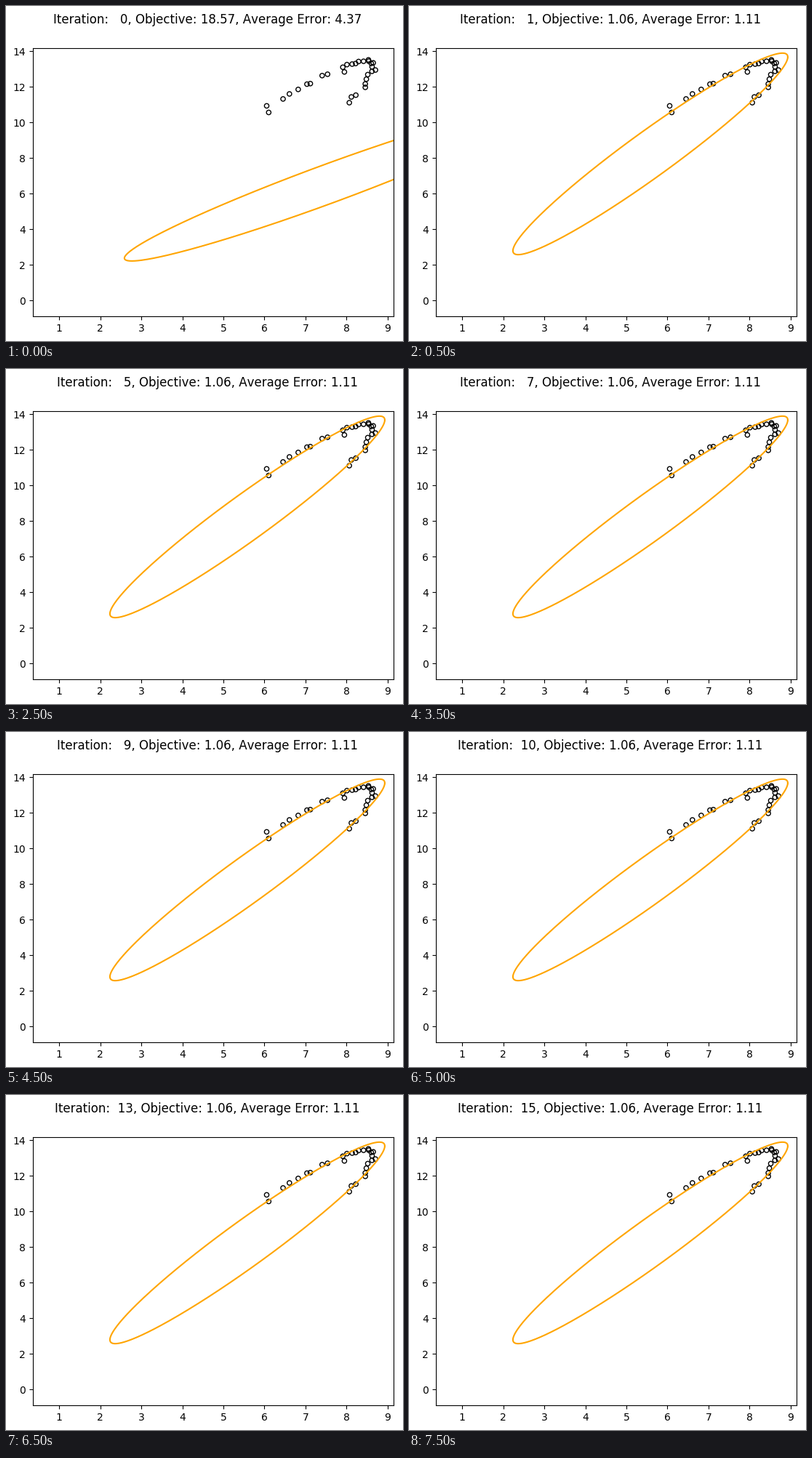
Write a matplotlib script that moves like this. It is 546 px wide and 461 px high and loops after 8 s.

```python
import numpy as np
import matplotlib.pyplot as plt
from matplotlib.animation import FuncAnimation

W, H, DPI = 546, 461, 100
STEPS, STEP_MS = 16, 500
LEFT, BOTTOM = 36.9, 33.8

plt.rcParams["font.family"] = "DejaVu Sans"
plt.rcParams["text.kerning_factor"] = 6


def ellipse(t, cx, cy, a, b, lag):
    """Points at angles t; y trails x by a phase of lag degrees."""
    return cx + a * np.cos(t), cy + b * np.cos(t - np.radians(lag))


def noisy_arc(n=30, sigma=0.06):
    """Samples along the upper right end of a tilted ellipse."""
    rng = np.random.default_rng(3)
    arc = ellipse(np.linspace(1.27, -0.58, n), 4.87, 6.95, 3.75, 6.5, 17.2)
    return np.array(arc) + rng.normal(0, sigma, (2, n))


def fit_state(step):
    """Ellipse, objective and average error; the fit settles in one step."""
    if step == 0:
        return (7.53, 6.543, 4.942, 4.314, 15.6), 18.57, 4.37
    return (5.583, 8.245, 3.348, 5.66, 16.0), 1.06, 1.11


fig = plt.figure(figsize=(W / DPI, H / DPI), dpi=DPI, facecolor="white")
ax = fig.add_axes([LEFT / W, BOTTOM / H, 496 / W, 369.6 / H])
ax.set(xlim=(0.357, 9.143), ylim=(-0.886, 14.2),
       xticks=range(1, 10), yticks=range(0, 15, 2))
ax.scatter(*noisy_arc(), s=20, facecolors="none", edgecolors="black", linewidths=1)
curve, = ax.plot([], [], color="orange", lw=1.5)
title = fig.text((LEFT + 240) / W, 1 - 9.6 / H, "", ha="center", va="top", fontsize=12)
turn = np.linspace(0, 2 * np.pi, 400)


def update(step):
    shape, objective, error = fit_state(step)
    curve.set_data(*ellipse(turn, *shape))
    title.set_text(f"Iteration: {step:3d}, Objective: {objective:.2f}, "
                   f"Average Error: {error:.2f}")
    return curve, title


anim = FuncAnimation(fig, update, frames=STEPS, interval=STEP_MS, repeat=True)
plt.show()
```
